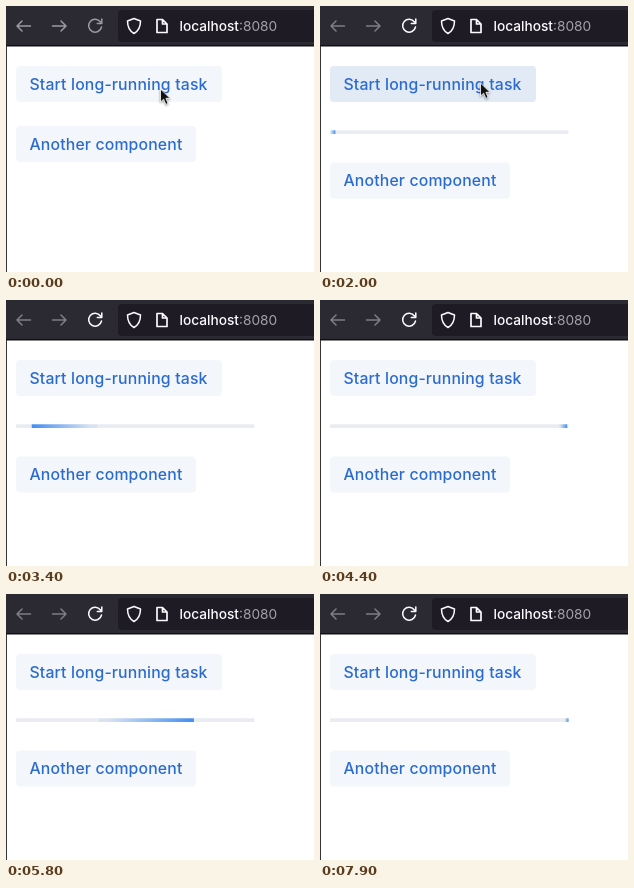
An HTML page for the animation above (8000 ms loop, 308 by 266 pixels).

```html
<!DOCTYPE html>
<html lang="en">
<head>
<meta charset="utf-8">
<title>Long-running task</title>
<style>
  html, body { margin: 0; width: 100%; height: 100%; overflow: hidden; background: #fff; }
  svg { display: block; width: 308px; height: 266px; font: 500 15.8px Inter, sans-serif; }
  .icon { fill: none; stroke-width: 1.5; stroke-linecap: round; stroke-linejoin: round; }
  .button { fill: #f3f6fa; }
  .button.hover { fill: #e2eaf6; }
  .label { fill: #2b6bd0; letter-spacing: .15px; }
  .url { font-size: 13.7px; fill: #fbfbfe; }
  .port { font-weight: 400; fill: #a3a2ab; }
  #cursor { filter: drop-shadow(0 1px 1px #0006); }
</style>
</head>
<body>
<svg viewBox="0 0 308 266">
  <defs>
    <linearGradient id="forward">
      <stop offset=".1" stop-color="#1676f3" stop-opacity=".1"/>
      <stop offset="1" stop-color="#1676f3"/>
    </linearGradient>
    <linearGradient id="reverse" href="#forward" x1="1" x2="0"/>
  </defs>

  <!-- Browser toolbar -->
  <rect width="308" height="40" fill="#2b2a33"/>
  <rect x="112" y="4" width="220" height="32" rx="4" fill="#1f1b24"/>
  <rect y="39" width="308" height="1.500" fill="#101014"/>
  <rect y="40" width="1" height="226" fill="#33333a"/>
  <g class="icon">
    <g id="arrows">
      <path d="M24.500 20H11M16 15L11 20l5 5"/>
      <path d="M46.500 20H60M55 15L60 20l-5 5"/>
    </g>
    <path id="reload" d="M94.500 16A6.500 6.500 0 1 0 95.500 21M95.800 13v4.500h-4.500"/>
    <g stroke="#fbfbfe">
      <path d="M128 12.500l6.500 2.500c0 6-2 10-6.500 12.500c-4.500-2.500-6.500-6.500-6.500-12.500z"/>
      <path d="M151 13.500h5.500l4.500 4.500v8.500h-10zM156.500 13.500v4.500h4.500" stroke-width="1.700"/>
    </g>
  </g>
  <text class="url" x="173.500" y="25">localhost<tspan class="port">:8080</tspan></text>

  <!-- Page -->
  <rect id="start" class="button" x="10" y="60" width="206" height="36" rx="4"/>
  <text class="label" x="23.500" y="84">Start long-running task</text>
  <g id="progress">
    <rect x="10" y="124.300" width="238.500" height="3.700" rx="1" fill="#eaecf2"/>
    <rect id="value" y="124.300" height="3.700" opacity=".8"/>
  </g>
  <g id="other">
    <rect class="button" x="10" y="120" width="180" height="36" rx="4"/>
    <text class="label" x="23.500" y="143.800">Another component</text>
  </g>
  <path id="cursor" d="M0 0v13l3.100-2.800l2.200 5.200l2.300-1l-2.200-5.100h4.100z"
        fill="#111" stroke="#fff" stroke-width=".8"/>
</svg>
<script>
const LOOP = 8000, FOCUS = 600, START = 1935, PERIOD = 1708;
const BAR_X = 10, BAR_WIDTH = 238.5;

// Cursor tip: time, x, y
const path = [
  [0, 154.5, 83], [700, 297, 187], [1000, 288, 169],
  [1850, 160.5, 77], [2150, 160.5, 77], [3200, 282, 268]
];

const $ = id => document.getElementById(id);
const set = (id, attrs) => {
  for (const name in attrs) $(id).setAttribute(name, attrs[name]);
};
const mix = (a, b, k) => a + (b - a) * k;
const ease = k => k < .5 ? 4 * k ** 3 : 1 - 4 * (1 - k) ** 3;
const smooth = k => k * k * (3 - 2 * k);

function cursorAt(t) {
  const next = path.findIndex(p => p[0] > t);
  if (next < 0) return path.at(-1).slice(1);
  const [t0, x0, y0] = path[next - 1], [t1, x1, y1] = path[next];
  const k = smooth((t - t0) / (t1 - t0));
  return [mix(x0, x1, k), mix(y0, y1, k)];
}

function drawProgress(t) {
  const phase = (t - START) / PERIOD % 1;
  const back = phase >= .5;
  const half = phase * 2 % 1;
  const travel = ease(half);
  const origin = back ? 1 - travel : travel;
  // Each sweep grows to 40% and shrinks again
  const grow = ease(half < .5 ? half * 2 : 2 - half * 2);
  const scale = mix(.015, .4, grow);
  set("value", {
    x: BAR_X + BAR_WIDTH * origin * (1 - scale),
    width: BAR_WIDTH * scale,
    fill: back ? "url(#reverse)" : "url(#forward)"
  });
}

function draw(t) {
  const focused = t >= FOCUS, running = t >= START;
  set("arrows", { stroke: focused ? "#7f7e87" : "#9b9aa3" });
  set("reload", { stroke: focused ? "#fbfbfe" : "#9b9aa3" });

  const [x, y] = cursorAt(t);
  set("cursor", { transform: `translate(${x} ${y})` });
  const over = x > 10 && x < 216 && y > 60 && y < 96;
  $("start").classList.toggle("hover", focused && over);

  set("progress", { visibility: running ? "visible" : "hidden" });
  set("other", { transform: `translate(0 ${running ? 36.5 : 0})` });
  if (running) drawProgress(t);
}

const begin = performance.now();
function tick() {
  draw((performance.now() - begin) % LOOP);
  requestAnimationFrame(tick);
}
tick();
</script>
</body>
</html>
```
